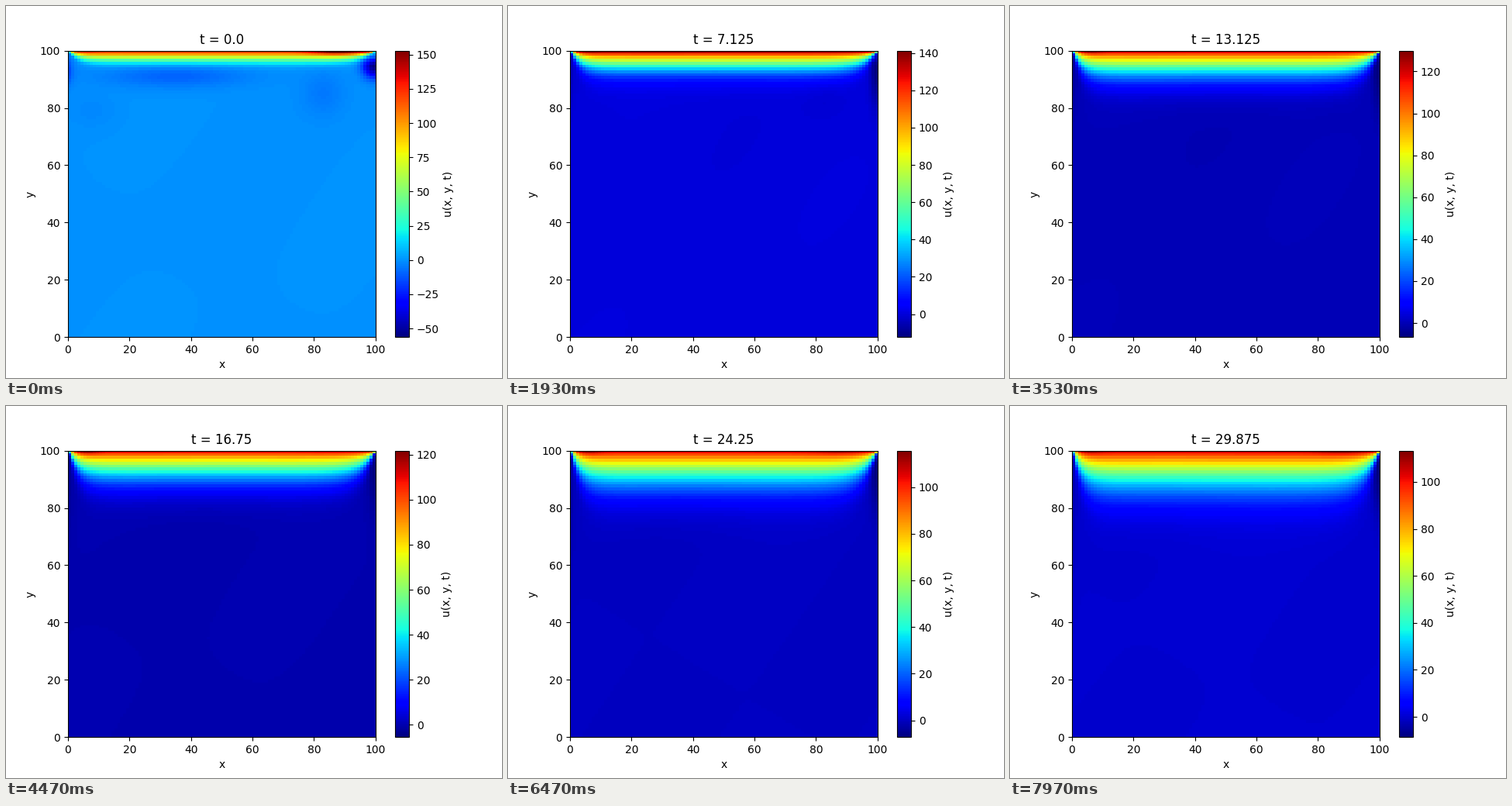
A matplotlib script that plays this animation: 640x480 px, repeating every 8000 ms.

```python
import math

import numpy as np
import matplotlib.pyplot as plt
from matplotlib.animation import FuncAnimation

FRAMES = 240
DT = 0.125
N = 100

# Slowly varying quantities at a few moments, linear in between
TIMES = [0, 3.125, 7.25, 13.25, 16.75, 24.25, 29.875]
VMIN = [-56.3, -41.7, -11.4, -6.6, -5.4, -7.2, -8.6]
VMAX = [152.9, 141.5, 141.3, 129.7, 121.7, 115.7, 113.3]
HEAT = [150, 150, 143, 123, 113, 107.5, 106]
LEFT_PEAK = [8, 1, 5, 12, 14, 11, 8]
RIGHT_PEAK = [55, 6, 0, 0, 2, 9, 11]

erfc = np.vectorize(math.erfc, otypes=[float])

cell = np.arange(N) + 0.5
x, y = np.meshgrid(cell, cell)
depth = 100 - y
right = 100 - x


def at(values, t):
    return np.interp(t, TIMES, values)


def bump(cx, cy, sx, sy):
    return np.exp(-((x - cx) / sx) ** 2 - ((y - cy) / sy) ** 2)


# Sides pull the heated layer up towards the corners
squeeze = (1 - np.exp(-x / 3)) * (1 - np.exp(-right / 4.5))
wall = 1 - np.exp(-(x + 0.3))
layer = depth / squeeze
left_top = np.exp(-((x - 6) / 4) ** 2 - depth / 1.3)
right_top = np.exp(-((x - 88) / 9) ** 2 - depth / 1.3)


def field(t):
    start = math.exp(-t / 1.2)
    fade = math.exp(-t / 2.6)
    reach = math.sqrt(9.5 + 8.2 * t)

    hot = (1 - start) * at(HEAT, t) * erfc(layer / reach)
    hot += start * 120 * np.exp(-(layer / 3.3) ** 2)
    hot += at(LEFT_PEAK, t) * left_top + at(RIGHT_PEAK, t) * right_top
    u = hot * wall

    # Cold corner on the right, stretching down the wall
    tail = 4 + 12 * (1 - math.exp(-t / 5))
    off = depth - 5.5
    spread = np.where(off < 0, 2.5, tail)
    width = 1.8 + 1.7 * fade
    u += at(VMIN, t) * np.exp(-(off / spread) ** 2 - ((right - 0.5) / width) ** 2)

    # Cold strip on the left
    u -= (4 + 16 * fade) * np.exp(-x / 1.2) * np.exp(-((depth - 7) / (5 + t)) ** 2)

    # Early undershoot below the layer
    u -= 10 * fade * bump(35, 91, 22, 4)
    u -= (3 + 2 * fade) * math.exp(-t / 8) * bump(83, 85, 7, 8)
    u -= 2 * fade * bump(8, 79, 8, 6)

    u += 0.35 * np.sin(0.07 * x - 0.045 * y + 0.12 * t) * np.cos(0.03 * y + 0.02 * x)
    return u


fig, ax = plt.subplots(figsize=(6.4, 4.8), dpi=100)
image = ax.imshow(field(0), cmap="jet", origin="lower", aspect="auto",
                  extent=(0, 100, 0, 100), interpolation="nearest",
                  vmin=VMIN[0], vmax=VMAX[0])
ax.set_xlabel("x")
ax.set_ylabel("y")
title = ax.set_title("t = 0.0")
fig.colorbar(image, ax=ax, label="u(x, y, t)")


def update(frame):
    t = frame * DT
    image.set_data(field(t))
    image.set_clim(at(VMIN, t), at(VMAX, t))
    title.set_text(f"t = {t}")
    return image, title


anim = FuncAnimation(fig, update, frames=FRAMES, interval=8000 / FRAMES,
                     repeat=True, repeat_delay=0, blit=False)
plt.show()
```
